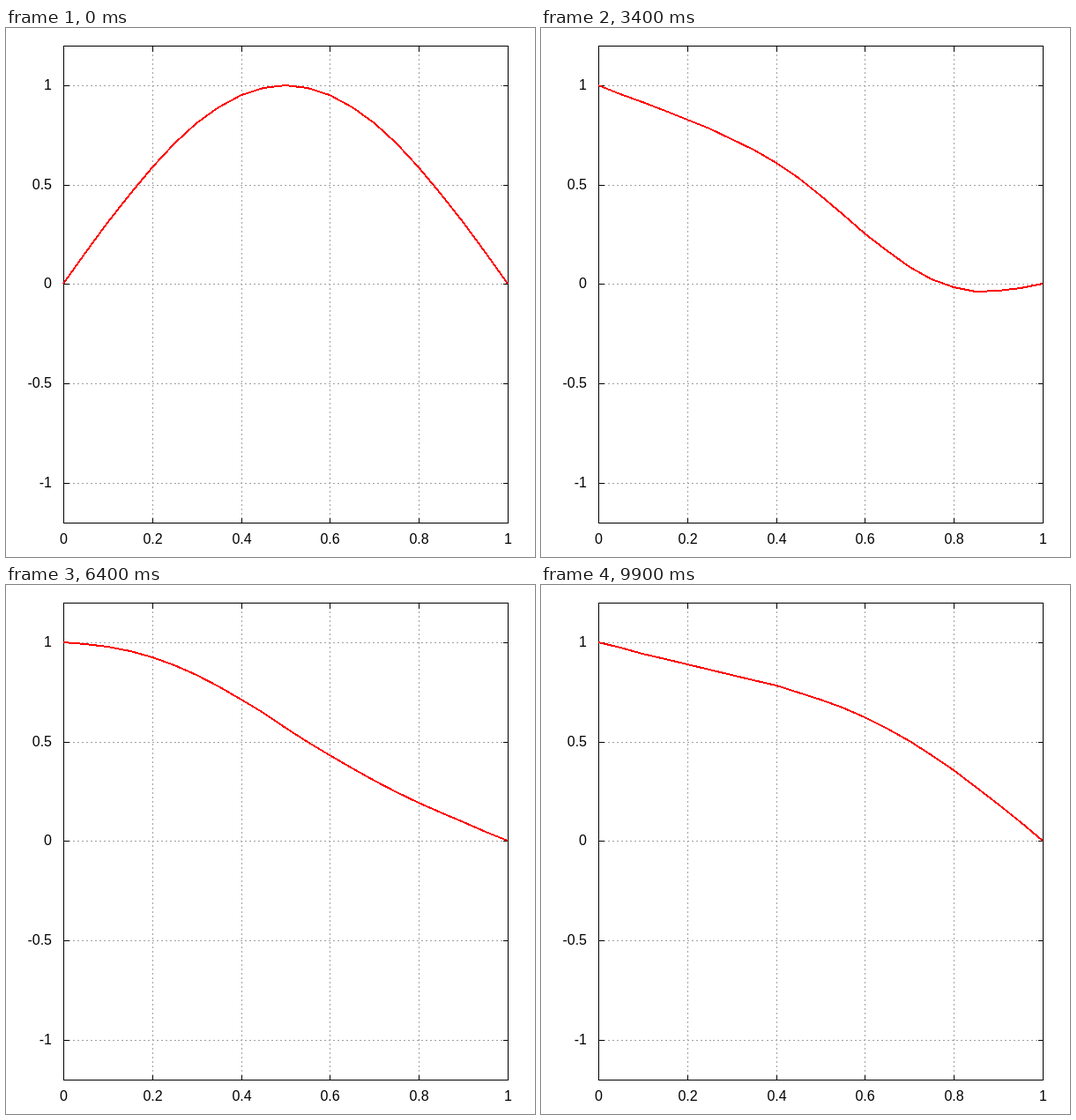
Write an HTML page that moves like this. It is 600 px wide and 600 px high and loops after 10000 ms.

```html
<!DOCTYPE html>
<html lang="en">
<head>
<meta charset="utf-8">
<title>Damped wave</title>
<style>
  html, body { margin: 0; width: 100%; height: 100%; overflow: hidden; background: #fff; }
  svg { display: block; width: 600px; height: 600px; }
  line, rect, polyline { shape-rendering: crispEdges; fill: none; }
  .grid { stroke: #a0a0a0; stroke-dasharray: 2 3; }
  .axis { stroke: #000; }
  .curve { stroke: #f00; stroke-width: 2; stroke-linejoin: round; }
  text { font: 16px "Liberation Sans", Arial, sans-serif; fill: #000; }
</style>
</head>
<body>
<svg viewBox="0 0 600 600">
  <clipPath id="plot"><rect x="64" y="19" width="506" height="543"/></clipPath>
  <g id="grid"></g>
  <g id="frame"></g>
  <polyline id="curve" class="curve" clip-path="url(#plot)"/>
</svg>
<script>
const LEFT = 65, RIGHT = 569, TOP = 20, BOTTOM = 561, TICK = 6;
const CELLS = 20, MODES = 60, DT = 0.01;
const STEP_MS = 100, STEPS = 100;

const $ = id => document.getElementById(id);
const px = x => LEFT + Math.round((RIGHT - LEFT) * x);
const py = u => BOTTOM - Math.round((BOTTOM - TOP) * (u + 1.2) / 2.4);

function add(parent, tag, attrs, text) {
  const el = document.createElementNS("http://www.w3.org/2000/svg", tag);
  for (const key in attrs) el.setAttribute(key, attrs[key]);
  if (text !== undefined) el.textContent = text;
  parent.appendChild(el);
}

// Lines run through pixel centres
function line(parent, cls, x1, y1, x2, y2) {
  add(parent, "line", { class: cls, x1: x1 + 0.5, y1: y1 + 0.5, x2: x2 + 0.5, y2: y2 + 0.5 });
}

function drawAxes() {
  const grid = $("grid"), frame = $("frame");
  for (const v of [0, 0.2, 0.4, 0.6, 0.8, 1]) {
    const x = px(v);
    if (v > 0 && v < 1) line(grid, "grid", x, BOTTOM, x, TOP);
    line(frame, "axis", x, BOTTOM, x, BOTTOM - TICK);
    line(frame, "axis", x, TOP, x, TOP + TICK);
    add(frame, "text", { x: x + 0.5, y: 585, "text-anchor": "middle" }, v);
  }
  for (const v of [-1, -0.5, 0, 0.5, 1]) {
    const y = py(v);
    line(grid, "grid", LEFT, y, RIGHT, y);
    line(frame, "axis", LEFT, y, LEFT + TICK, y);
    line(frame, "axis", RIGHT, y, RIGHT - TICK, y);
    add(frame, "text", { x: 52, y: y + 5, "text-anchor": "end" }, v);
  }
  add(frame, "rect", {
    class: "axis", x: LEFT + 0.5, y: TOP + 0.5, width: RIGHT - LEFT, height: BOTTOM - TOP
  });
}

// Amplitude of each sine mode under implicit time steps of DT
function amplitudes(t) {
  const list = [], n = t / DT;
  for (let k = 1; k <= MODES; k++) {
    const z = k * Math.PI * DT;
    const start = (k === 1 ? 1 : 0) - 2 / (k * Math.PI);
    list.push(start * Math.pow(1 + z * z, -n / 2) * Math.cos(n * Math.atan(z)));
  }
  return list;
}

// String held at 1 on the left and 0 on the right, released from sin(pi x)
function drawCurve(step) {
  const amps = amplitudes(step / 10), points = [];
  for (let i = 0; i <= CELLS; i++) {
    const x = i / CELLS;
    const u = step === 0
      ? Math.sin(Math.PI * x)
      : amps.reduce((sum, a, k) => sum + a * Math.sin((k + 1) * Math.PI * x), 1 - x);
    points.push(px(x) + "," + py(u));
  }
  $("curve").setAttribute("points", points.join(" "));
}

let shown = -1;
function tick() {
  const step = Math.floor(performance.now() / STEP_MS) % STEPS;
  if (step !== shown) drawCurve(shown = step);
  requestAnimationFrame(tick);
}

drawAxes();
tick();
</script>
</body>
</html>
```
